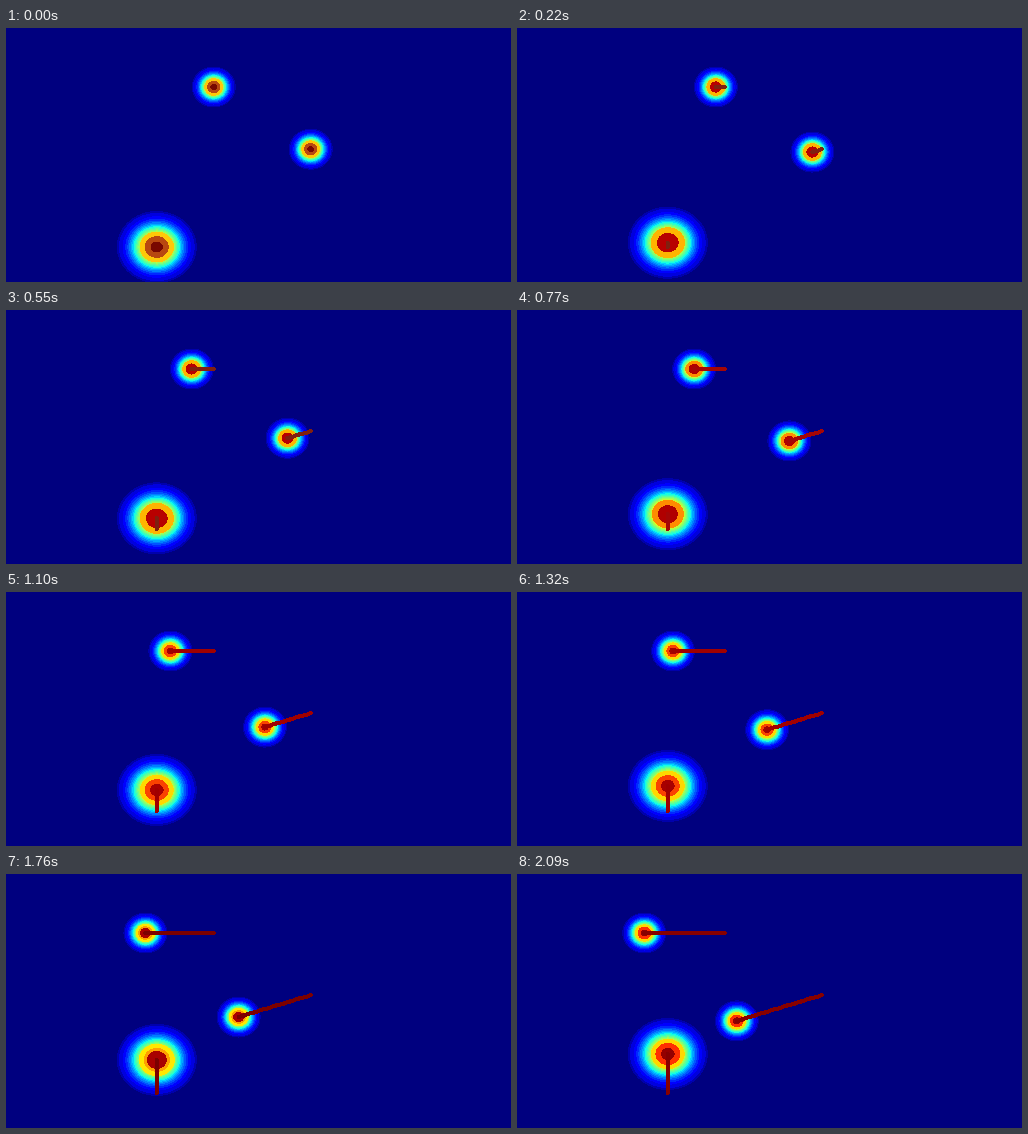
A matplotlib script for the animation above (2.2 s loop, 505 px wide and 254 px high).

```python
import numpy as np
import matplotlib.pyplot as plt
from matplotlib.animation import FuncAnimation
from matplotlib.colors import to_rgb

W, H, FRAMES, STEP = 505, 254, 20, 110
LEVELS = 24
FALLOFF = 3.1

# start, end, horizontal and vertical radius
BLOBS = [
    ((207.7, 59.0), (127.3, 59.0), 22.0, 20.5),
    ((304.7, 121.2), (219.8, 146.9), 22.0, 20.5),
    ((150.8, 219.0), (150.8, 180.0), 40.0, 36.0),
]

# Tones that hold around a moment: trail colour, then (relative radius, colour)
TONES = {
    0: ("#7a2408", [(.43, "#ffc808"), (.30, "#b84810"), (.15, "#780800")]),
    3: ("#802010", [(.43, "#ffb400"), (.27, "#b80000")]),
    7: ("#a40606", [(.40, "#ff8c00"), (.25, "#b00000")]),
    10: ("#a00000", [(.42, "#ffd800"), (.30, "#fa4200"), (.17, "#a80000")]),
    14: ("#780010", [(.42, "#ffa800"), (.32, "#ff3c00"), (.20, "#d00000"),
                     (.10, "#8c0000")]),
    16: ("#7c0000", [(.45, "#ffe800"), (.33, "#ffa000"), (.25, "#a80000")]),
    19: ("#860000", [(.42, "#ffd800"), (.31, "#ff3000"), (.17, "#940000")]),
}

Y, X = np.mgrid[0:H, 0:W] + 0.5
jet = plt.get_cmap("jet")


def center(blob, i):
    (x0, y0), (x1, y1) = blob[:2]
    p = i / (FRAMES - 1)
    p += 0.05 * p * (1 - p)  # slows down slightly
    return x0 + (x1 - x0) * p, y0 + (y1 - y0) * p


def draw_blob(img, blob, i, bands):
    cx, cy = center(blob, i)
    rx, ry = blob[2:]
    r = np.hypot((X - cx) / rx, (Y - cy) / ry)
    inside = r < 1
    value = np.exp(-FALLOFF * r[inside] ** 2)
    img[inside] = jet(np.round(value * LEVELS) / LEVELS)[:, :3]
    for radius, color in bands:
        img[r < radius] = to_rgb(color)


def draw_trail(img, blob, i, color):
    # The path runs through points snapped to whole rows
    points = [center(blob, k) for k in range(i + 1)]
    points = [(x, round(y)) for x, y in points]
    for (ax, ay), (bx, by) in zip(points, points[1:]):
        dx, dy = bx - ax, by - ay
        px, py = X - ax, Y - ay
        s = np.clip((px * dx + py * dy) / (dx * dx + dy * dy + 1e-9), 0, 1)
        img[np.hypot(px - s * dx, py - s * dy) < 2.1] = to_rgb(color)


def render(i):
    trail, bands = TONES[min(TONES, key=lambda k: abs(k - i))]
    img = np.empty((H, W, 3))
    img[:] = jet(0.0)[:3]
    for blob in BLOBS:
        draw_blob(img, blob, i, bands)
        draw_trail(img, blob, i, trail)
    return img


fig = plt.figure(figsize=(W / 100, H / 100), dpi=100, facecolor="#000080")
ax = fig.add_axes([0, 0, 1, 1])
ax.axis("off")
picture = ax.imshow(render(0), interpolation="nearest", aspect="auto")


def update(i):
    picture.set_data(render(i))
    return (picture,)


anim = FuncAnimation(fig, update, frames=FRAMES, interval=STEP,
                     repeat=True, repeat_delay=0)
plt.show()
```
